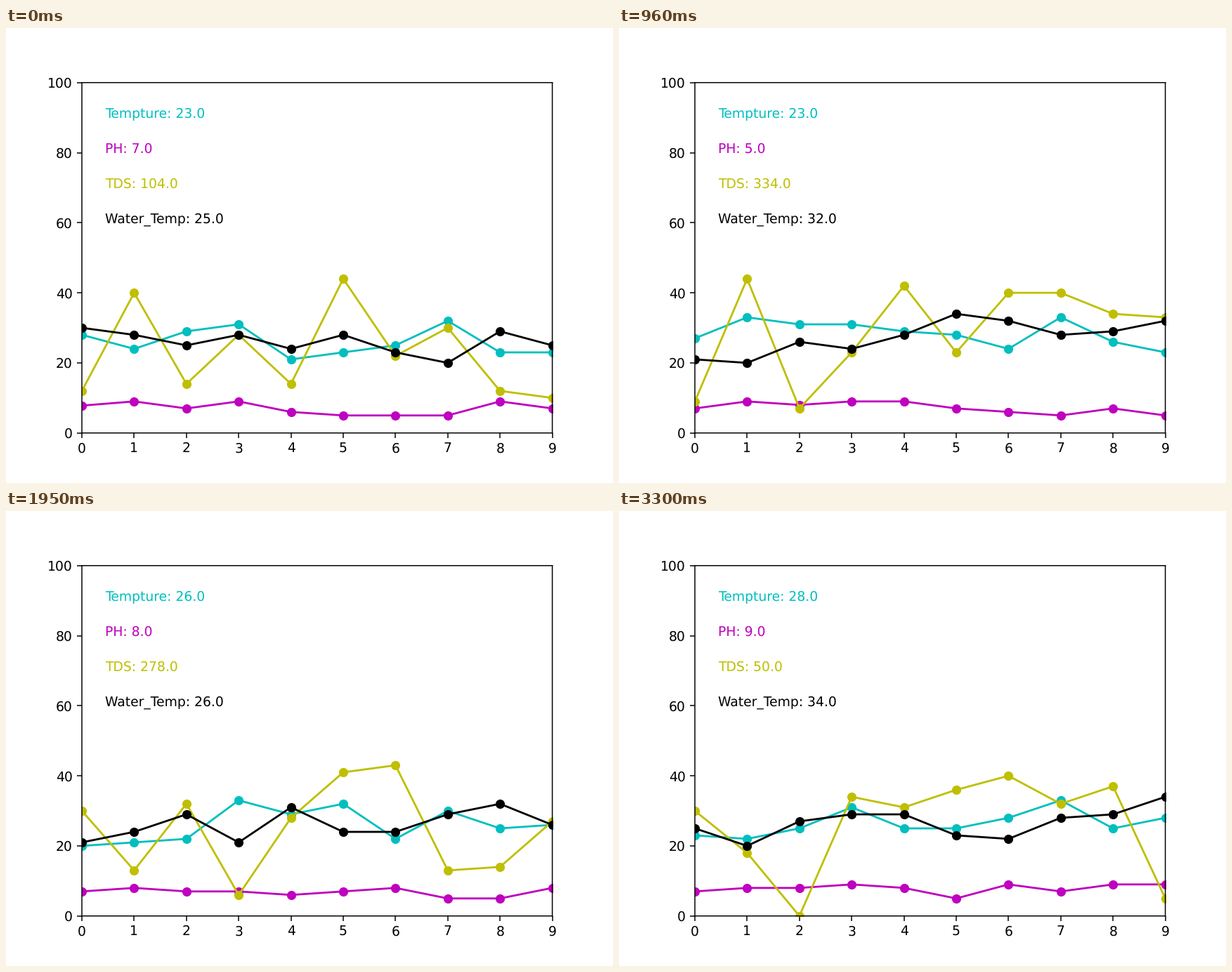
These frames come from a looping animation (864x648 px, 3330 ms). A matplotlib script:

```python
import numpy as np
import matplotlib.pyplot as plt
from matplotlib.animation import FuncAnimation

FRAMES = 111
INTERVAL = 30
WINDOW = 10
RESTART = 60  # the sensors report their first reading again after this many

# Soft, unsnapped edges and unhinted glyphs.
plt.rcParams["path.snap"] = False
plt.rcParams["text.hinting"] = "no_hinting"

rng = np.random.default_rng(7)


def make_log(low, high, opening):
    """Uniform whole readings in [low, high] after a fixed opening."""
    log = rng.integers(low, high + 1, FRAMES + WINDOW - 1).astype(float)
    log[:WINDOW] = opening
    log[::RESTART] = opening[0]
    return log


# label, colour, plot divisor, log
SERIES = [
    ("Tempture", "c", 1,
     make_log(20, 33, [28, 24, 29, 31, 21, 23, 25, 32, 23, 23])),
    ("PH", "m", 1,
     make_log(5, 9, [7.8, 9, 7, 9, 6, 5, 5, 5, 9, 7])),
    ("TDS", "y", 10,
     make_log(0, 449, [120, 400, 140, 280, 140, 440, 220, 300, 120, 104])),
    ("Water_Temp", "k", 1,
     make_log(20, 34, [30, 28, 25, 28, 24, 28, 23, 20, 29, 25])),
]

fig, ax = plt.subplots(figsize=(6.4, 4.8), dpi=135)
ax.set_xlim(0, WINDOW - 1)
ax.set_ylim(0, 100)
ax.set_xticks(range(WINDOW))

x = np.arange(WINDOW)
lines, labels = [], []
for i, (_, color, _, _) in enumerate(SERIES):
    lines.append(ax.plot(x, np.zeros(WINDOW), "o-", color=color)[0])
    labels.append(ax.text(0.05, 0.9 - 0.1 * i, "", color=color,
                          transform=ax.transAxes))


def update(frame):
    """Slide the window one reading along and show the newest values."""
    for (name, _, div, log), line, label in zip(SERIES, lines, labels):
        view = log[frame:frame + WINDOW]
        line.set_ydata(view // div if div > 1 else view)
        label.set_text(f"{name}: {view[-1]:.1f}")
    return lines + labels


anim = FuncAnimation(fig, update, frames=FRAMES, interval=INTERVAL,
                     init_func=lambda: update(0), repeat=True, repeat_delay=0)
plt.show()
```
